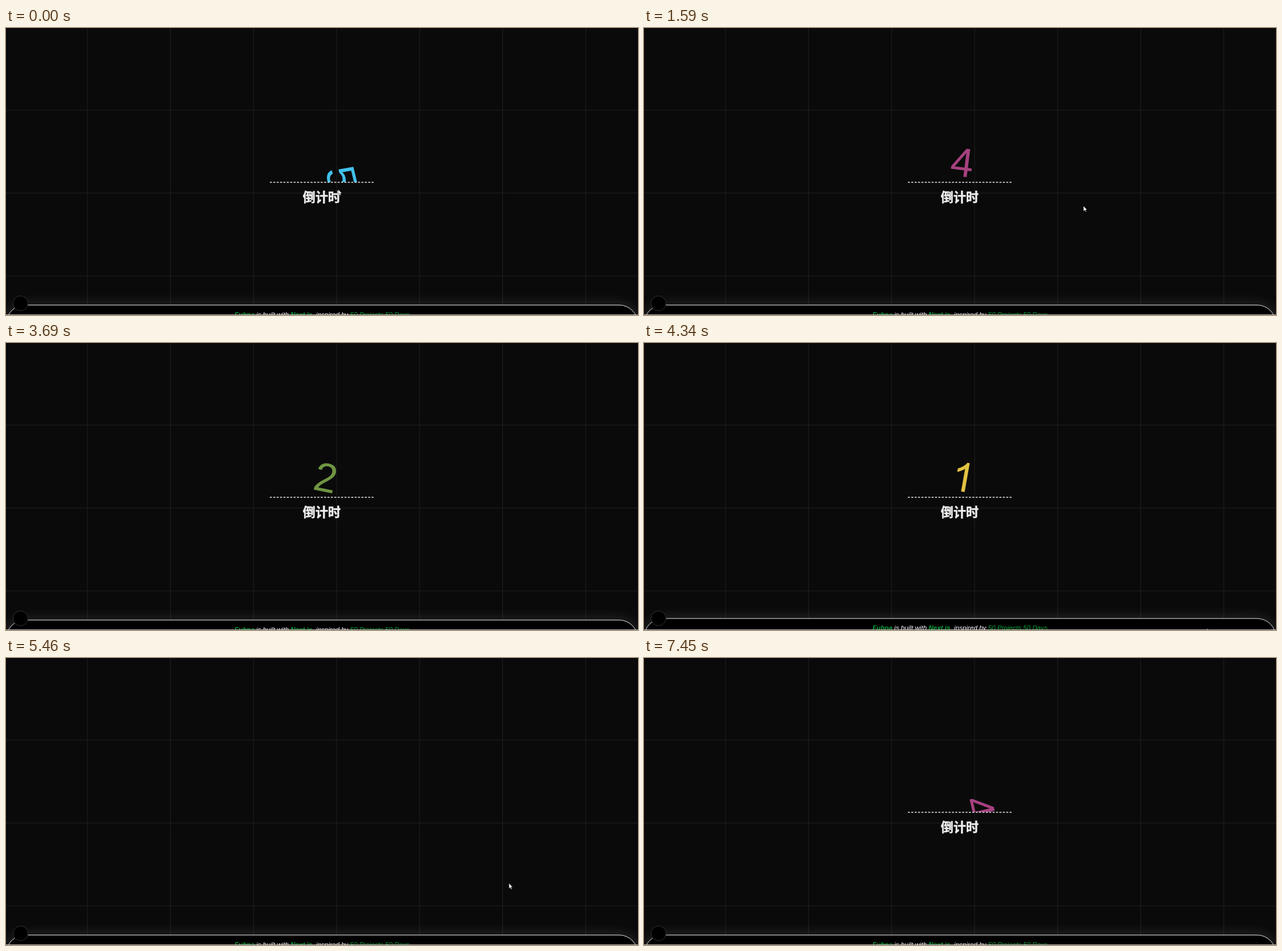
These frames come from a looping animation (1109 by 505 pixels, 7.52 s). An HTML page:

```html
<!DOCTYPE html>
<html lang="zh">
<head>
<meta charset="utf-8">
<title>倒计时</title>
<style>
  html, body { margin: 0; width: 100%; height: 100%; overflow: hidden; background: #0a0a0a; }
  #stage { position: relative; width: 1109px; height: 505px; overflow: hidden; background: #0a0a0a;
    font-family: "Liberation Sans", Arial, sans-serif; }
  #stage > *, .counter > * { position: absolute; }
  .grid { left: 0; top: 0; }
  .counter { left: 0; top: 0; width: 1109px; height: 505px; transform-origin: 554px 255px; }
  .nums { left: 454px; top: 190px; width: 200px; height: 81px; overflow: hidden; }
  .digit { position: absolute; left: 60px; top: 10px; width: 80px; height: 72px;
    font-size: 72px; line-height: 72px; text-align: center; transform-origin: 50% 100%; }
  .digit svg { display: block; }
  .rule { left: 463px; top: 270px; }
  .label { left: 454px; top: 279.5px; width: 200px; text-align: center; color: #ededed;
    font: 700 22.2px/32px "Noto Sans CJK SC", "Noto Sans CJK", sans-serif;
    -webkit-text-stroke: .5px #ededed; }
  .footer { left: 0; top: 487px; width: 1109px; height: 80px; box-sizing: border-box;
    background: #000; border: 1px solid #e5e5e5; border-radius: 33px;
    box-shadow: 0 0 24px rgba(255, 255, 255, .15); }
  .footer p { position: absolute; right: 400px; top: 8px; margin: 0; white-space: nowrap;
    color: #fff; font-size: 11.66px; line-height: 16px; font-style: italic; }
  .footer b, .footer i { color: #00a63e; }
  .badge { left: 11.5px; top: 470.5px; width: 25px; height: 25px; border-radius: 50%;
    background: #000; border: 1px solid #333; }
  .edge { left: 0; top: 504px; width: 1109px; height: 1px; background: #bdbdbd; }
  .cursor { left: 0; top: 0; overflow: visible; }
</style>
</head>
<body>
<div id="stage">
  <svg class="grid" width="1109" height="505">
    <defs>
      <pattern id="cell" x="142.3" y="144.1" width="145.75" height="145.75" patternUnits="userSpaceOnUse">
        <path d="M.5 0V145.75M0 .5H145.75" stroke="#1f1f1f"/>
      </pattern>
    </defs>
    <rect width="1109" height="505" fill="url(#cell)"/>
  </svg>
  <div class="counter">
    <div class="nums"><div class="digit"></div></div>
    <svg class="rule" width="182" height="3">
      <path d="M0 1.5H182" stroke="#f2f2f2" stroke-width="1.3" stroke-dasharray="3.57 2.38"/>
    </svg>
    <div class="label">倒计时</div>
  </div>
  <div class="footer">
    <p><b>Fubna</b> is built with <b>Next.js</b>, inspired by <i>50 Projects 50 Days</i></p>
  </div>
  <div class="badge"></div>
  <div class="edge"></div>
  <svg class="cursor" width="8" height="12">
    <path d="M0 0V9.4L2.2 7.4L3.6 10.8L5 10.2L3.6 6.9H6.4Z" fill="#fff" stroke="#000" stroke-width=".5"/>
  </svg>
</div>
<script>
  const LOOP = 7520, SPIN = 1000;
  const HIDE = 5055, REPLAY = 6318;
  const $ = s => document.querySelector(s);
  const digit = $('.digit'), counter = $('.counter'), footer = $('.footer'), cursor = $('.cursor');

  const COLORS = { 5: '#42c0ec', 4: '#a5417f', 3: '#b96116', 2: '#6f9542', 1: '#e0c141' };
  // A "1" without a foot, which the text font lacks.
  const ONE = `<svg width="80" height="72"><path fill="currentColor"
    transform="translate(40 61) scale(.03516 -.03516) translate(-569.5 0)"
    d="M763 0H583V1147Q518 1085 412.5 1023T223 930V1104Q374 1175 487 1276T647 1472H763Z"/></svg>`;

  // [digit, ms at which it swings in]
  const TURNS = [[5, -57], [4, 965], [3, 1980], [2, 3027], [1, 4038], [5, 6378], [4, 7393]];
  // [ms, degrees]: in, settle, out
  const SWING = [[0, 120], [150, -20], [300, 10], [500, 0], [800, 20], [SPIN, -120]];
  // [ms, x, y]
  const PATH = [[0, 583, 284], [750, 766, 313], [2300, 775, 313], [2830, 818, 325], [3400, 1100, 520],
    [4200, 1000, 520], [4670, 934, 424], [5530, 882, 396], [6150, 590, 308], [6510, 638, 305], [7080, 660, 520]];
  // [ms, px]: the footer rises while the pointer crosses it
  const LIFTS = [[3400, 2], [4540, 20], [7110, 2]];
  const LIFT_TIME = 230;

  // CSS ease-in-out, solved by Newton steps.
  function ease(p) {
    let u = p;
    for (let i = 0; i < 5; i++) {
      u -= (1.26 * u - .78 * u * u + .52 * u ** 3 - p) / (1.26 - 1.56 * u + 1.56 * u * u);
    }
    return u * u * (3 - 2 * u);
  }

  function follow(keys, t) {
    const i = keys.findIndex(k => k[0] > t);
    if (i < 0) return keys[keys.length - 1].slice(1);
    const [t0, ...from] = keys[i - 1], [t1, ...to] = keys[i];
    const k = ease((t - t0) / (t1 - t0));
    return from.map((v, j) => v + (to[j] - v) * k);
  }

  let shown = 0;
  function show(n) {
    if (n === shown) return;
    shown = n;
    digit.style.color = COLORS[n];
    digit.innerHTML = n === 1 ? ONE : n;
  }

  function render(t) {
    const [n, start] = TURNS.filter(turn => turn[1] <= t).pop();
    show(n);
    digit.style.visibility = t - start < SPIN ? 'visible' : 'hidden';
    digit.style.transform = `rotate(${follow(SWING, t - start)[0]}deg)`;

    const shrink = t < REPLAY ? Math.min(1, Math.max(0, (t - HIDE) / 200)) : 0;
    counter.style.transform = `scale(${(1 - shrink) ** 1.5})`;

    const lift = LIFTS.reduce((sum, [at, px]) =>
      sum + px * Math.max(0, 1 - Math.abs(t - at) / LIFT_TIME), 0);
    footer.style.transform = `translateY(${-lift}px)`;

    const [x, y] = follow(PATH, t);
    cursor.style.transform = `translate(${x}px, ${y}px)`;
  }

  const begin = performance.now();
  function tick() {
    render((performance.now() - begin) % LOOP);
    requestAnimationFrame(tick);
  }
  tick();
</script>
</body>
</html>
```
